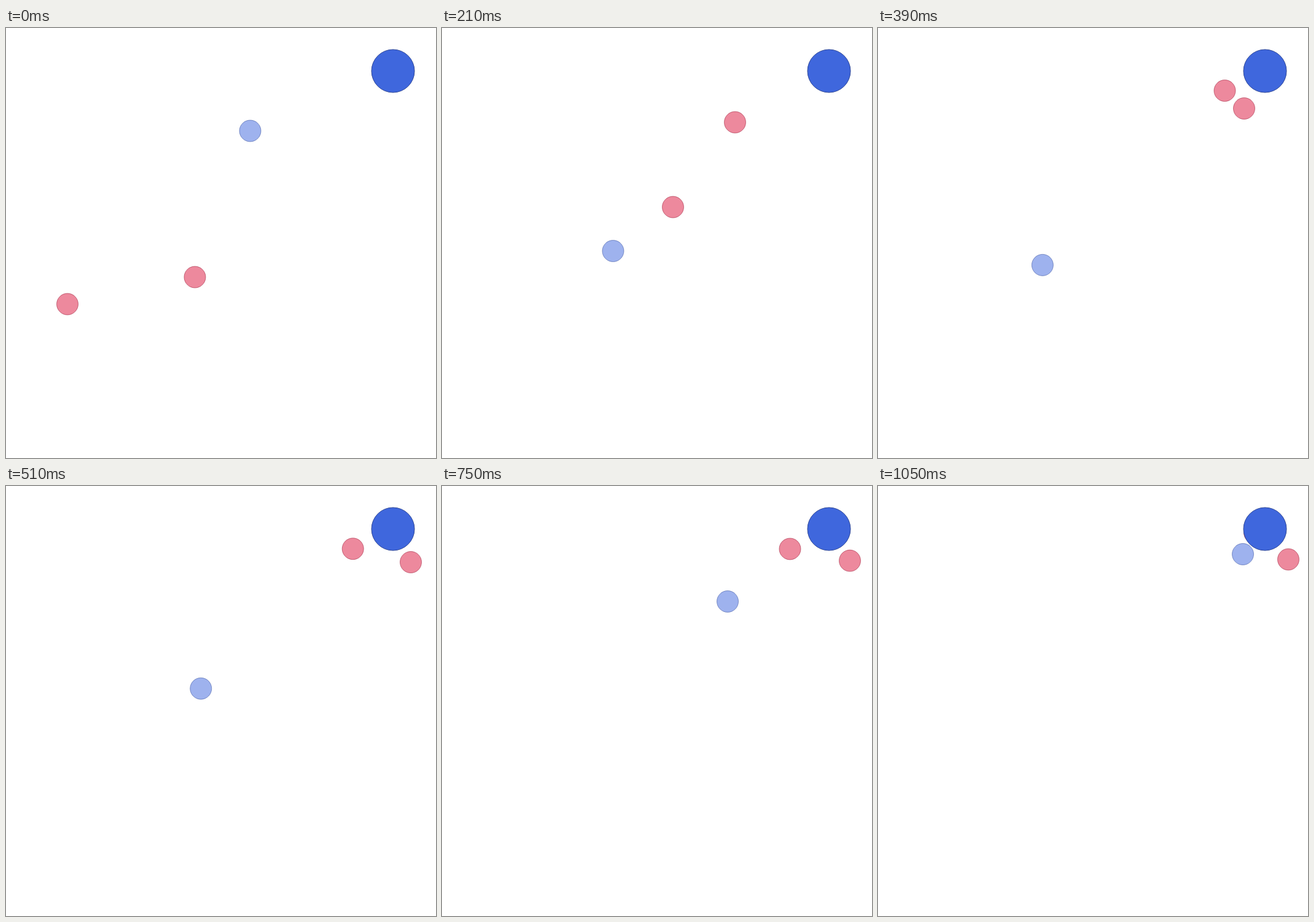
An HTML page with a canvas that plays this animation: 700 px wide and 700 px high, repeating every 1.08 s.

```html
<!DOCTYPE html>
<html>
<head>
<meta charset="utf-8">
<style>
  html, body { margin: 0; width: 100%; height: 100%; overflow: hidden; background: #fff; }
  canvas { display: block; }
</style>
</head>
<body>
<canvas id="stage" width="700" height="700"></canvas>
<script>
const ctx = document.getElementById('stage').getContext('2d');
const STEP = 30, STEPS = 36;
const BLUE = { fill: '63,103,221', edge: '45,70,150' };
const RED = { fill: '220,20,60', edge: '150,15,45' };

// Key points [step, x, y]: where each disc starts, turns or bounces.
const runner = [
  [0, 397.5, 167.5], [7, 278.5, 363], [11, 260, 395], [21, 382.5, 260],
  [25, 465, 188], [31, 584.5, 90], [35, 594, 111]
];
const farChaser = [
  [0, 100, 449.5], [7, 376, 291.5], [13, 596, 131], [16, 658, 124.5], [35, 668, 119.5]
];
const nearChaser = [
  [0, 307.5, 405.5], [4, 365, 235], [7, 477, 153.5], [10, 583, 88], [13, 564.5, 102],
  [29, 568, 102.5], [31, 581.5, 80.5], [33, 592, 44], [35, 613, 76]
];

// Harmonic mean of the neighbouring rates, flat at a turn, so nothing overshoots.
function slope(path, i, axis) {
  const last = path.length - 2;
  const rate = j => (path[j + 1][axis] - path[j][axis]) / (path[j + 1][0] - path[j][0]);
  const before = rate(Math.max(i - 1, 0)), after = rate(Math.min(i, last));
  return before * after > 0 ? 2 * before * after / (before + after) : 0;
}

function position(path, step) {
  const i = path.findLastIndex((p, k) => k < path.length - 1 && p[0] <= step);
  const a = path[i], b = path[i + 1], span = b[0] - a[0];
  const u = (step - a[0]) / span, v = 1 - u;
  return [1, 2].map(axis =>
    v * v * (1 + 2 * u) * a[axis] + u * u * (1 + 2 * v) * b[axis] +
    span * u * v * (v * slope(path, i, axis) - u * slope(path, i + 1, axis)));
}

function disc([x, y], radius, { fill, edge }, alpha) {
  ctx.beginPath();
  ctx.arc(x, y, radius, 0, Math.PI * 2);
  ctx.fillStyle = `rgba(${fill},${alpha})`;
  ctx.fill();
  ctx.strokeStyle = `rgba(${edge},${alpha})`;
  ctx.stroke();
}

function draw(time) {
  const step = Math.floor(time / STEP) % STEPS;
  ctx.clearRect(0, 0, 700, 700);
  disc(position(runner, step), 17.5, BLUE, 0.5);
  disc(position(farChaser, step), 17.5, RED, 0.5);
  disc(position(nearChaser, step), 17.5, RED, 0.5);
  disc([630, 70], 35, BLUE, 1);
}

let start;
function tick(now) {
  start ??= now;
  draw(now - start);
  requestAnimationFrame(tick);
}
draw(0);
requestAnimationFrame(tick);
</script>
</body>
</html>
```
